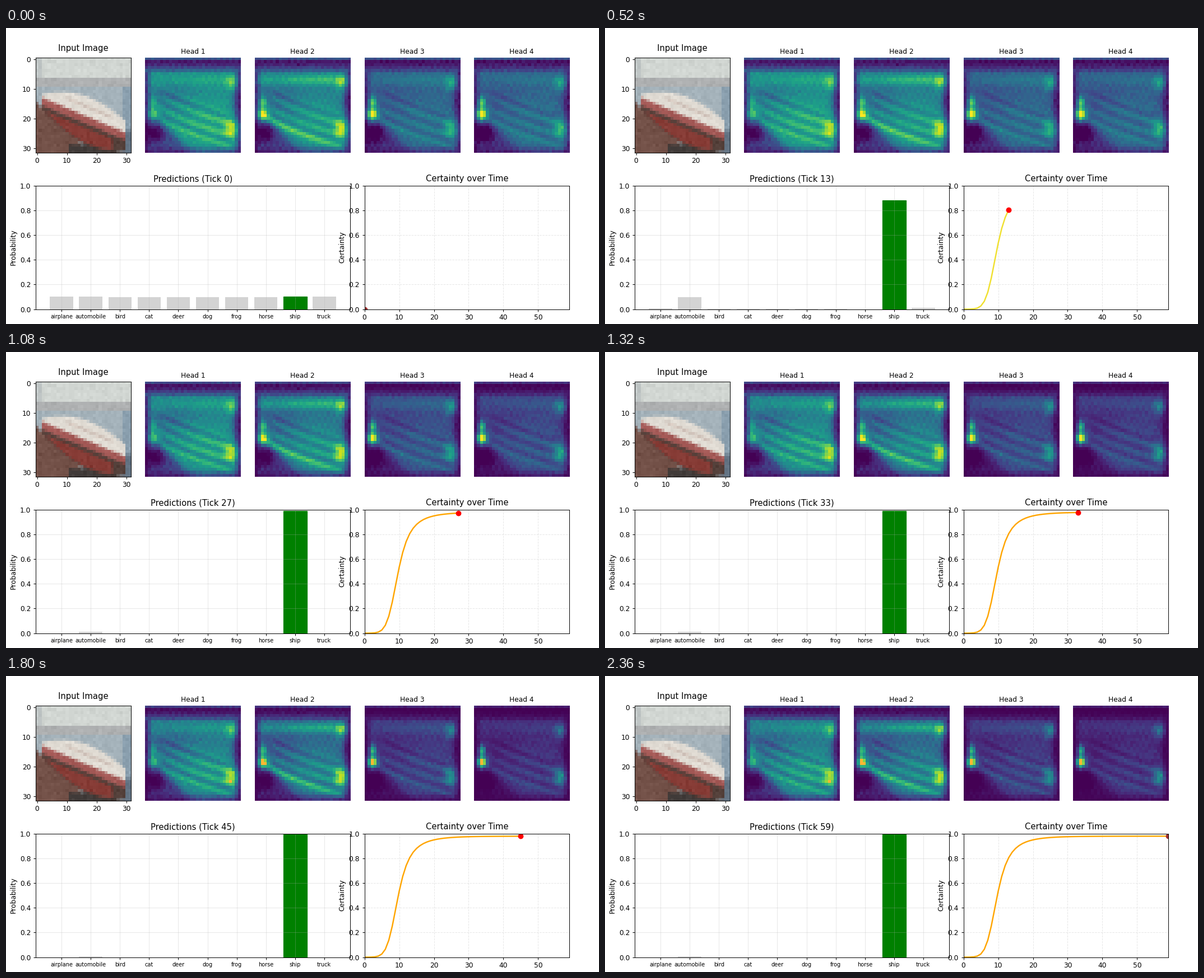
Write a matplotlib script that moves like this. It is 1058 px wide and 529 px high and loops after 2400 ms.

```python
import numpy as np
import matplotlib.pyplot as plt
from matplotlib.animation import FuncAnimation

TICKS = 60
N = 32
SUB = 4  # samples per picture cell
LABELS = ("airplane automobile bird cat deer "
          "dog frog horse ship truck").split()
SHIP = LABELS.index("ship")
AFFINITY = np.array([-.58, 0, -.79, -.9, -1.01, -.96, -.81, -1.23, .435, -.43])

X, Y = np.meshgrid(np.arange(N), np.arange(N))
rng = np.random.default_rng(4)
viridis = plt.get_cmap("viridis")
plt.rcParams["font.family"] = "DejaVu Sans"


def smooth(u):
    u = np.clip(u, 0, 1)
    return u * u * (3 - 2 * u)


def blob(x, y, sx, sy):
    return np.exp(-((X - x) / sx) ** 2 / 2 - ((Y - y) / sy) ** 2 / 2)


def boat():
    """A moored hull in flat tones, averaged down to N x N cells."""
    side = (np.arange(N * SUB) + 0.5) / SUB - 0.5
    x, y = np.meshgrid(side, side)
    deck = 11.2 + 0.021 * (x - 8) ** 2
    seam = 13.2 + 0.42 * (x - 2)
    keel = 31 - 0.024 * (26 - x) ** 2
    hull = (x > 1.6) & (x < 29.4)
    layers = [
        (y > -1, "#d1d6d2"),
        ((y < 7) & (x < 1.5), "#c0c6c6"),
        (y > 6.5, "#aeb0b1"),
        (y > 9.5, "#a4b2ba"),
        ((y > 9.5) & (x > 28.5), "#8a9fae"),
        ((y > 24) & (x > 28), "#647484"),
        ((y > 17.5) & (y > 14 + x) | (y > keel) & (x < 14), "#735148"),
        ((y > 28.8) & (x > 10.5) & (x < 27), "#403a38"),
        (hull & (y > seam) & (y < keel), "#54403a"),
        (hull & (y > seam + 4) & (y < keel - 0.5) & (x < 25), "#873c36"),
        (hull & (y > seam) & (y < seam + 2.6), "#a55a57"),
        (hull & (y > deck) & (y < seam), "#e1dcd4"),
        ((abs(y - seam + 3.2) < 0.5) & (x > 10) & (x < 25), "#cebfb6"),
    ]
    img = np.zeros((N * SUB, N * SUB, 3))
    for mask, color in layers:
        img[mask] = plt.matplotlib.colors.to_rgb(color)
    img = img.reshape(N, SUB, N, SUB, 3).mean(axis=(1, 3))
    return np.clip(img + rng.normal(0, 0.015, (N, N, 1)), 0, 1)


def attention(base, glow, strip, band, stern, bow):
    s = Y - 0.4 * X
    lower = s - 18.2 - np.sin(np.pi * X / 28)
    hull = (smooth((X - 3) / 5) * smooth((30 - X) / 3)
            * smooth((s - 6) / 3) * smooth((21 - s) / 2))
    edge = (0.3 + 0.7 * smooth((X + 0.4) / 2.5)) \
        * (0.3 + 0.7 * smooth((31.3 - X) / 2.5)) \
        * (0.45 + 0.55 * smooth((31.6 - Y) / 3))

    v = base * edge * (1 - 0.2 * blob(7, 12, 6, 3))
    v += glow * blob(21, 22, 7, 5)
    v += hull * 0.2 * base * np.cos(2 * np.pi * lower / 3.9)
    v += strip * np.exp(-(lower / 1.5) ** 2) * smooth((X - 1) / 2) \
        * smooth((29 - X) / 2) * (1 - 0.02 * X)
    v *= 1 - 0.55 / (1 + np.exp(-1.2 * (Y - 20.8 - 0.95 * (X - 4))))
    v -= 0.25 * blob(3, 25, 2.2, 2.2)
    v += band * (0.5 + 0.5 * smooth(X / 20)) * edge \
        * np.exp(-((Y - 7.2) / 1.7) ** 2)
    v *= 1 - 0.6 * blob(31, 14.5, 1.6, 4)

    # Dim rows along the top edge
    ramp = base * (0.1 + 0.035 * Y ** 2) * (0.6 + 0.4 * edge)
    v = np.where(Y < 5, ramp, v)
    v[0] = 0.26

    v += 0.018 * (1 - 2 * ((X + Y // 2) % 2)) * (1 - 0.5 * hull)
    v += rng.normal(0, 0.018, v.shape)
    v += stern * (blob(2, 18.7, 1.2, 1.4) + 0.6 * blob(2.2, 14.6, 0.8, 1.2))
    v += bow * blob(28.3, 23.5, 1.6, 2.1) + 0.26 * blob(28.4, 8.3, 1.3, 1.5)
    return np.clip(v, 0, 1)


HEADS = [
    attention(base=0.50, glow=0.13, strip=0.05, band=0.10, stern=0.35, bow=0.40),
    attention(base=0.44, glow=0.13, strip=0.26, band=0.24, stern=0.65, bow=0.48),
    attention(base=0.33, glow=0.05, strip=0.06, band=0.09, stern=0.85, bow=0.33),
    attention(base=0.33, glow=0.05, strip=0.06, band=0.06, stern=0.85, bow=0.34),
]
FADE = (0.28, 0.34, 0.65, 0.9)


def heat(k, t):
    v = HEADS[k] ** (1 + FADE[k] * smooth((t - 6) / 46))
    rgba = viridis(v)
    if t >= 45:
        rgba[v > 0.93] = (1, 0.72, 0.2, 1)
    return rgba


def probs(t):
    """Softmax whose sharpness follows a Gompertz curve."""
    p = np.exp(AFFINITY * 11 * np.exp(-6.34 * np.exp(-0.162 * t)))
    return p / p.sum()


def certainty(t):
    p = probs(t)
    return 1 + (p * np.log(p)).sum() / np.log(len(p))


TIME = np.arange(TICKS)
CERTAINTY = np.array([certainty(t) for t in TIME])

fig = plt.figure(figsize=(12, 6), dpi=1058.1 / 12)
gs = fig.add_gridspec(2, 5, left=0.05, right=0.95, top=0.9, bottom=0.05,
                      wspace=0.15, hspace=0.3, height_ratios=[1, 1.3])

ax = fig.add_subplot(gs[0, 0])
ax.imshow(boat(), interpolation="nearest")
ax.set_title("Input Image", pad=10)
ax.set_xticks(range(0, N, 10))
ax.set_yticks(range(0, N, 10))

maps = []
for k in range(4):
    ax = fig.add_subplot(gs[0, k + 1])
    maps.append(ax.imshow(heat(k, 0), interpolation="nearest"))
    ax.set_title(f"Head {k + 1}", fontsize=10)
    ax.axis("off")

ax_bar = fig.add_subplot(gs[1, :3])
bars = ax_bar.bar(range(10), probs(0), color="lightgray")
bars[SHIP].set(facecolor="green", edgecolor="green", linewidth=1)
ax_bar.set_xticks(range(10), LABELS, fontsize=8)
ax_bar.set_xlim(-0.89, 9.89)
ax_bar.set_ylim(0, 1)
ax_bar.set_ylabel("Probability")
ax_bar.grid(alpha=0.3)
title = ax_bar.set_title("Predictions (Tick 0)")

ax_cert = fig.add_subplot(gs[1, 3:])
line, = ax_cert.plot([], [], lw=2)
dot, = ax_cert.plot([], [], "o", ms=7)
ax_cert.set_xlim(0, TICKS - 1)
ax_cert.set_ylim(0, 1)
ax_cert.set_xticks(range(0, TICKS, 10))
ax_cert.set_title("Certainty over Time")
ax_cert.set_xlabel("Tick")
ax_cert.set_ylabel("Certainty")
ax_cert.grid(alpha=0.3, linestyle="--")


def update(t):
    for k, m in enumerate(maps):
        m.set_data(heat(k, t))
    for bar, p in zip(bars, probs(t)):
        bar.set_height(p)
    title.set_text(f"Predictions (Tick {t})")
    line.set_data(TIME[:t + 1], CERTAINTY[:t + 1])
    line.set_color("#f0e030" if t < 20 else "orange")
    dot.set_data([t], [CERTAINTY[t]])
    dot.set_color("red" if 10 <= t <= 56 else "#a03030")
    return [*maps, *bars, title, line, dot]


anim = FuncAnimation(fig, update, frames=TICKS, interval=40, repeat=True)
plt.show()
```
